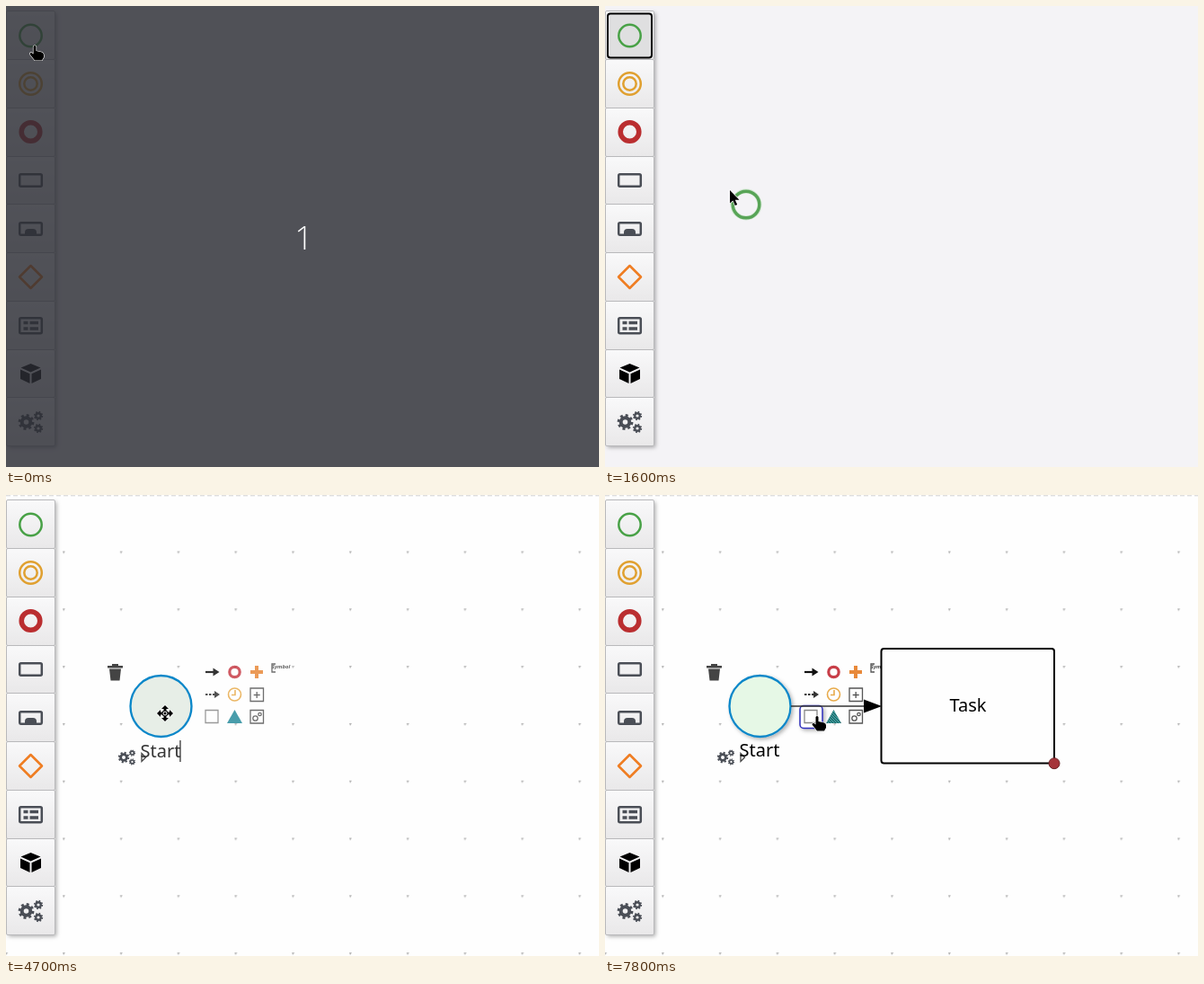
An HTML page for the animation above (8 s loop, 660 px wide and 513 px high).

```html
<!DOCTYPE html>
<html lang="en">
<head>
<meta charset="utf-8">
<title>Process modeller</title>
<style>
html, body { margin: 0; width: 100%; height: 100%; overflow: hidden; background: #f4f3f6; }
svg { display: block; width: 660px; height: 513px; }
text { font: 20px "Noto Sans", sans-serif; text-anchor: middle; }
.line { fill: none; stroke: #4a4e56; stroke-width: 2.5; stroke-linejoin: round; }
.pad { fill: none; stroke: #555; stroke-width: 1.3; }
.cursor { fill: #000; stroke: #fff; stroke-width: 1.2; paint-order: stroke; stroke-linejoin: round; }
</style>
</head>
<body>
<svg viewBox="0 0 660 513">
  <defs>
    <linearGradient id="face" x2="0" y2="1">
      <stop stop-color="#f9f9fa"/><stop offset="1" stop-color="#e9e8e9"/>
    </linearGradient>
    <filter id="soft" x="-30%" y="-30%" width="160%" height="160%">
      <feDropShadow dx="2" dy="2" stdDeviation="2" flood-opacity=".3"/>
    </filter>
    <pattern id="dots" x="63" y="62.5" width="63.8" height="63.8" patternUnits="userSpaceOnUse">
      <path d="M0 0h3l-2 3z" fill="#b4b4b4"/>
    </pattern>
    <pattern id="hatch" width="3" height="3" patternUnits="userSpaceOnUse">
      <path d="M0 0h3v3h-3z" fill="#3c9a9a"/><path d="M0 0l3 3" stroke="#17585c"/>
    </pattern>
    <g id="gear" fill="none" stroke="#4a4e56">
      <circle r="4.8" stroke-width="4"/>
      <circle r="7.4" stroke-width="3" stroke-dasharray="2.9 2.912"/>
    </g>
    <g id="gears">
      <use href="#gear" x="-5"/>
      <use href="#gear" transform="translate(8.5 -7) scale(.58)"/>
      <use href="#gear" transform="translate(8.5 7) scale(.58)"/>
    </g>
  </defs>

  <rect width="660" height="513" fill="#f4f3f6"/>

  <g id="canvas">
    <rect width="660" height="513" fill="#fefefe"/>
    <rect y="20" width="660" height="493" fill="url(#dots)"/>
    <path d="M0 .8H660" stroke="#d2d2d2" stroke-dasharray="5 3"/>
    <path d="M113 190h17v2.5h-17zM118 188h7v2h-7zM115 193.500h13l-1.500 13h-10z" fill="#444"/>
    <use href="#gears" transform="translate(134.500 292) scale(.7)"/>
    <path d="M151 287.500l4.500 4.500-4.500 4.500z" fill="#fff" stroke="#444" stroke-width="1.300"/>
    <circle id="event" cx="172.500" cy="235" r="34" stroke="#0b87c9" stroke-width="2.300"/>

    <g id="icons">
      <path d="M222 197h10" stroke="#111" stroke-width="2.200"/>
      <path d="M230.500 192.500l7 4.500-7 4.500z" fill="#111"/>
      <circle cx="254.500" cy="197" r="5.700" fill="none" stroke="#c83e48" stroke-width="3.200"/>
      <path d="M272 197h14M279 190v14" stroke="#e8893a" stroke-width="4"/>
      <path class="pad" d="M300 188h-4v9h4"/>
      <text x="306" y="193" style="font-size:6px;font-weight:700;font-style:italic" fill="#444">Symbol</text>
      <path d="M222 222h11" stroke="#333" stroke-width="2" stroke-dasharray="2.500 1.500"/>
      <path d="M232 218l6 4-6 4z" fill="#333"/>
      <g fill="none" stroke="#e8ab4c" stroke-width="1.600">
        <circle cx="254.500" cy="222" r="7"/>
        <path d="M255 217v5.500h-4"/>
      </g>
      <path class="pad" d="M272 215h14.500v14.500h-14.500zM279.200 219v7M275.700 222.500h7"/>
      <rect id="hover" x="217" y="234.500" width="25" height="25" rx="4" fill="#fff" stroke="#2d2dba" stroke-width="1.500" filter="url(#soft)"/>
      <path class="pad" d="M222 239.500h14v14h-14z" style="stroke:#888"/>
      <path id="triangle" d="M254.500 239l8.500 15h-17z"/>
      <path class="pad" d="M272 239.500h14.500v14.500h-14.500z"/>
      <circle class="pad" cx="277.500" cy="248.500" r="2.700"/>
      <circle class="pad" cx="282.500" cy="244" r="1.700"/>
    </g>
    <path id="smudge" d="M248 233h7v7l1 2v10l-1 2v7h-7v-6l-2-3v-10l2-2z" fill="#292b2f"/>

    <g id="task">
      <path d="M207 235H290" stroke="#333" stroke-width="1.500"/>
      <path d="M288 227.500L308 235L288 242.500z"/>
      <rect x="307.500" y="171" width="192.500" height="127.500" rx="3" fill="#fefefe" stroke="#000" stroke-width="2"/>
      <text x="404" y="241">Task</text>
      <circle cx="500" cy="298.700" r="6" fill="#a5343a" stroke="#6b2327"/>
    </g>
    <text id="label" x="172"></text>
    <path id="caret" d="M0 273v24" stroke="#222" stroke-width="1.200"/>
  </g>

  <g id="palette">
    <rect x=".5" y="5.500" width="54" height="484" rx="2" fill="#eee" filter="url(#soft)"/>
    <g id="buttons"></g>
    <rect id="focus" x="3" y="8.500" width="49" height="49" rx="3" fill="#dfdfe0" stroke="#000" stroke-width="2"/>
    <circle cx="27.500" cy="33" r="12.200" fill="none" stroke="#48a146" stroke-width="2.500"/>
    <g fill="none" stroke="#e0a030" stroke-width="2.500">
      <circle cx="27.500" cy="86.500" r="12.300"/><circle cx="27.500" cy="86.500" r="7.200"/>
    </g>
    <circle cx="27.500" cy="140" r="10.300" fill="none" stroke="#ba2e30" stroke-width="5.600"/>
    <rect class="line" x="15.200" y="187.200" width="24.600" height="13.600" rx="1.500"/>
    <rect class="line" x="15.200" y="241.200" width="24.600" height="13.600" rx="1.500"/>
    <path d="M21 255v-3q0-4 4-4h5q4 0 4 4v3z" fill="#4a4e56"/>
    <path class="line" d="M27.500 289l12.500 12.500-12.500 12.500-12.500-12.500z" style="stroke:#ef7d22"/>
    <rect class="line" x="15.200" y="347.200" width="24.600" height="17" rx="1.500"/>
    <path d="M19.500 352.500h5M26.500 352.500h9.500M19.500 359h5M26.500 359h9.500" stroke="#4a4e56" stroke-width="3.500"/>
    <path d="M27.500 398l11 4.500-11 5-11-5zM16 404.500l10.500 4.800v10.700l-10.500-5zM39 404.500l-10.500 4.800v10.700l10.500-5z"/>
    <use href="#gears" x="27.500" y="463"/>
  </g>

  <g id="ghost" fill="none">
    <circle r="15" stroke="#cfe6cf" stroke-width="5"/><circle r="14.800" stroke="#58a457" stroke-width="3.400"/>
  </g>

  <g id="countdown">
    <rect width="660" height="513" fill="#2c2e35" opacity=".82"/>
    <text x="321.300" y="271" fill="#fff" style="font:300 36px 'Open Sans',sans-serif;text-anchor:start">1</text>
  </g>

  <g id="pointer">
    <path class="cursor" id="hand" d="M-1.500 1q1.500-2 3 0v5l6.500 1.500q2 1 2 3v2.500l-2 3.500h-8l-5.500-7q0-2 2-1.500l2 1.500z"/>
    <path class="cursor" id="arrow" d="M0 0v14.500l3.400-3 2.400 5.500 2.400-1-2.400-5.300h4.700z"/>
    <g id="move">
      <path class="cursor" d="M0-9l4 4h-2.500v3.500h3.500v-2.500l4 4-4 4v-2.500h-3.500v3.500h2.500l-4 4-4-4h2.500v-3.500h-3.500v2.500l-4-4 4-4v2.500h3.500v-3.500h-2.500z"/>
      <circle r="3.300"/><circle r="2" fill="none" stroke="#fff"/>
    </g>
  </g>
</svg>
<script>
const $ = id => document.getElementById(id);
const LOOP = 8000, STEP = 100;

const edges = [5.5, 59.5, 113.5, 167.5, 220.5, 274.5, 328.5, 382.5, 435.5, 489.5];
$('buttons').innerHTML = edges.slice(0, -1).map((y, i) =>
  `<rect x=".5" y="${y}" width="54" height="${edges[i + 1] - y}" rx="1.5" fill="url(#face)" stroke="#b9b9bb"/>`).join('');

// time, shape, x, y, glides towards the next key
const path = [
  [0, 'hand', 32, 44], [600, 'hand', 34, 40],
  [700, 'arrow', 34, 40, 1], [1200, 'arrow', 100, 118, 1], [1600, 'arrow', 139, 205],
  [1800, 'move', 204, 223], [2000, 'move', 204, 223, 1], [2300, 'move', 181, 241],
  [2800, 'move', 181, 241, 1], [3300, 'move', 177, 243],
  [5900, 'arrow', 290, 238], [6000, 'arrow', 385, 232], [6200, 'arrow', 340, 242],
  [6400, 'arrow', 300, 240], [6500, 'hand', 251, 241], [6600, 'hand', 224, 250, 1],
  [6900, 'hand', 236, 246]
];
const typing = [[4000, 'S'], [4200, 'St'], [4300, 'Sta'], [4500, 'Star'], [4700, 'Start']];
const caretSpans = [[3300, 3500], [4000, 5300], [5900, 6400]];

const within = (t, from, to = LOOP) => t >= from && t < to;
const show = (id, on) => $(id).setAttribute('display', on ? 'inline' : 'none');
const place = (id, x, y) => $(id).setAttribute('transform', `translate(${x} ${y})`);

function cursorAt(t) {
  const i = path.findLastIndex(key => key[0] <= t);
  const [start, shape, x, y, glide] = path[i];
  if (!glide) return [shape, x, y];
  const [end, , nx, ny] = path[i + 1];
  const k = (t - start) / (end - start);
  return [shape, x + (nx - x) * k, y + (ny - y) * k];
}

function draw(t) {
  const [shape, x, y] = cursorAt(t);
  const editing = within(t, 2900, 7500), done = t >= 7500;

  show('countdown', t < 100);
  show('canvas', t >= 1800);
  show('focus', within(t, 800, 1800));
  show('ghost', within(t, 800, 1800));
  place('ghost', x + 18, y + 16);
  place('pointer', x, y);
  for (const id of ['hand', 'arrow', 'move']) show(id, id === shape);

  $('event').setAttribute('fill', editing ? '#e7eee7' : '#e6f8e6');
  $('event').setAttribute('filter', editing ? 'none' : 'url(#soft)');
  $('icons').setAttribute('opacity', done ? 1 : .85);
  $('triangle').setAttribute('fill', done ? 'url(#hatch)' : '#2a8d9d');
  show('hover', t >= 6600);
  show('smudge', within(t, 6600, 6900));
  show('task', done);

  const label = $('label');
  label.textContent = typing.findLast(key => key[0] <= t)?.[1] ?? '';
  label.setAttribute('y', done ? 291 : 292);
  label.setAttribute('fill', done ? '#000' : '#333');
  show('caret', caretSpans.some(span => within(t, ...span)));
  place('caret', 172.5 + (label.textContent ? label.getComputedTextLength() / 2 - 1 : 1), 0);
}

const begin = performance.now();
function tick() {
  const t = (performance.now() - begin) % LOOP;
  draw(Math.floor(t / STEP) * STEP);
  requestAnimationFrame(tick);
}
tick();
</script>
</body>
</html>
```
